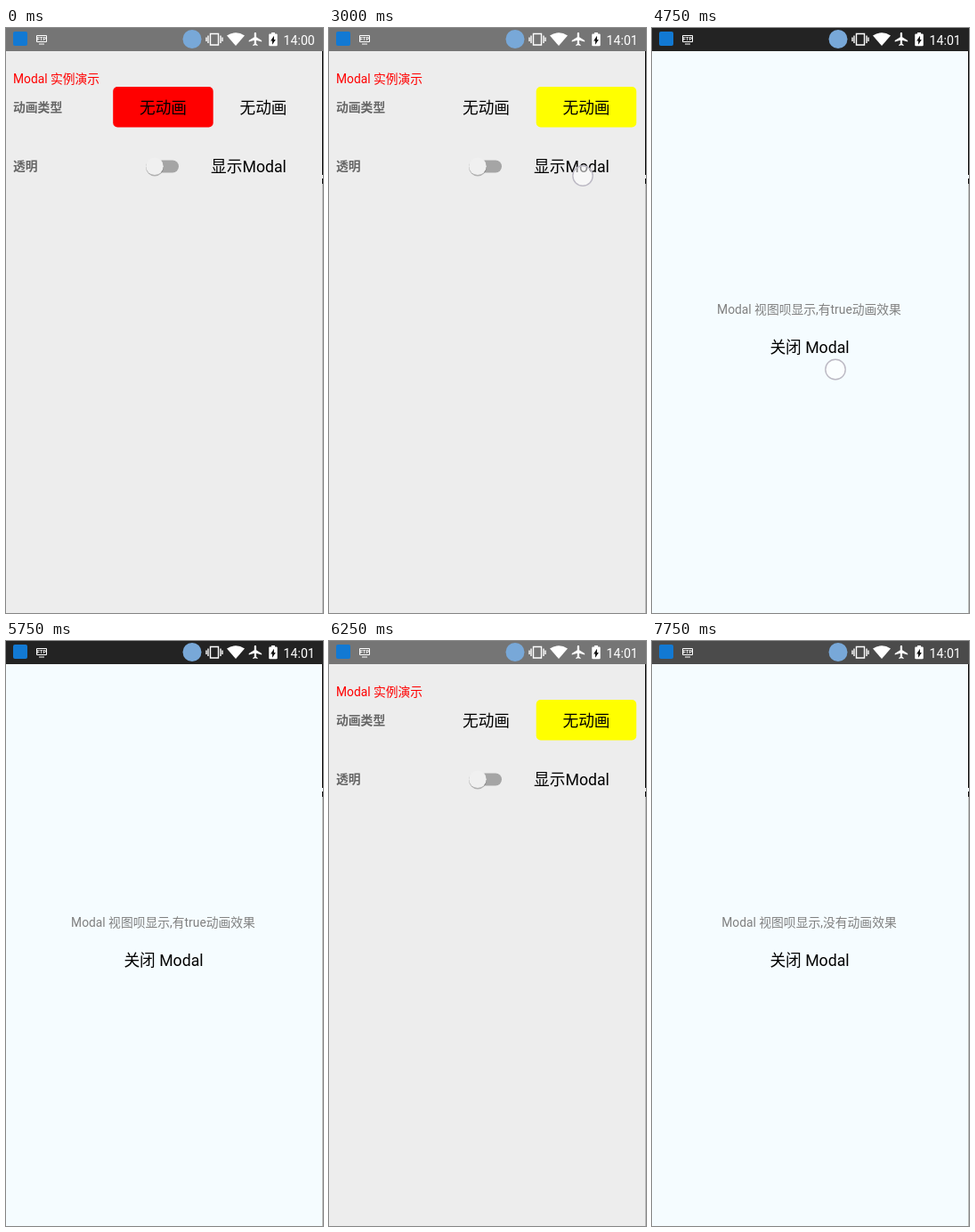
Write an HTML page that moves like this. It is 356 by 657 pixels and loops after 8 s.

```html
<!DOCTYPE html>
<html lang="zh-CN">
<head>
<meta charset="utf-8">
<style>
  html, body { margin: 0; width: 100%; height: 100%; overflow: hidden; }
  svg { display: block; font: 13.8px Roboto, "Noto Sans CJK SC", "Noto Sans CJK", sans-serif; }
  .big { font-size: 17.7px; }
  .label { font-weight: 700; fill: #666; }
  .mid { text-anchor: middle; }
</style>
</head>
<body>
<svg width="356" height="657" viewBox="0 0 356 657">
  <g id="page">
    <rect width="356" height="657" fill="#ededed"/>
    <text x="8" y="62" fill="#f00">Modal 实例演示</text>
    <text class="label" x="8" y="94">动画类型</text>
    <text class="label" x="8" y="160">透明</text>
    <rect id="choice" y="66" width="112.5" height="45.5" rx="5"/>
    <g class="big mid">
      <text x="176.5" y="96">无动画</text>
      <text x="289" y="96">无动画</text>
      <text x="272.5" y="162">显示Modal</text>
    </g>
    <rect x="160" y="148.5" width="34" height="14" rx="7" fill="#a5a5a5"/>
    <circle cx="167" cy="156.5" r="10" fill="#000" opacity=".25"/>
    <circle cx="167" cy="155.3" r="9.8" fill="#f0f0f0"/>
    <rect id="dim" width="356" height="657" opacity=".09"/>
  </g>

  <g id="modal" class="mid">
    <rect width="356" height="657" fill="#f5fcff"/>
    <rect id="pressed" x="20" y="336" width="314" height="44" rx="5" fill="#a9d9d4"/>
    <text id="message" x="176.5" y="320.5" fill="#808080"></text>
    <text class="big" x="177" y="365">关闭 Modal</text>
  </g>

  <circle id="touch" r="11.2" fill="#fff" fill-opacity=".55" stroke="#bcb9c4" stroke-width="1.4"/>

  <rect id="bar" width="356" height="26"/>
  <g fill="#fff">
    <rect x="8" y="4" width="16" height="16" rx="2" fill="#1279d3"/>
    <path d="M34.5 8.5h11v7h-11zM37 18h6" fill="none" stroke="#fff"/>
    <text class="mid" x="40" y="14.3" font-size="5.5" font-weight="700">FTP</text>
    <circle cx="209" cy="12.5" r="10.5" fill="#78a8d8"/>
    <path d="M229.5 6.5h9v12.5h-9zM227 8.5v8.5M225 10.5v4.5M241 8.5v8.5M243 10.5v4.5" fill="none" stroke="#fff" stroke-width="1.4"/>
    <path d="M248 8.5Q258 2 268 8.5L258 20z"/>
    <path transform="translate(271.2 3.4) scale(.76)" d="M21 16v-2l-8-5V3.5c0-.83-.67-1.5-1.5-1.5S10 2.67 10 3.5V9l-8 5v2l8-2.5V19l-2 1.5V22l3.5-1 3.5 1v-1.5L13 19v-5.5l8 2.5z"/>
    <rect x="297" y="8" width="6" height="11" fill="#111"/>
    <path transform="translate(288.6 3.5) scale(.95 .76)" d="M15.7 4H14V2h-4v2H8.3Q7 4 7 5.3v15.4Q7 22 8.3 22h7.4q1.3 0 1.3-1.3V5.3Q17 4 15.7 4zM11 20v-5.5H9L13 7v5.5h2z"/>
    <text id="clock" x="311.5" y="18.5" font-size="14.2"></text>
  </g>
  <path d="M355 26h1v139h-1zM355 169h1v6h-1z"/>
  <path d="M355 175h1v482h-1z" fill="#b8b8b8"/>
</svg>
<script>
const LOOP = 8000;
const el = id => document.getElementById(id);
const show = (id, on) => el(id).setAttribute("display", on ? "inline" : "none");

// start, end, x, y
const touches = [
  [3000, 3250, 285, 166],
  [4750, 5000, 206, 383.5],
  [5000, 5250, 247, 307],
  [6750, 7000, 171.5, 92.5],
  [7500, 7750, 284.5, 159.5]
];

function render(t) {
  const within = (from, to) => t >= from && t < to;
  const animated = within(3250, 6000);
  const modal = animated || t >= 7750;
  const dimmed = within(6000, 6250);
  const yellow = within(500, 1500) || within(2000, 7000);
  const touch = touches.find(([from, to]) => within(from, to));

  show("page", !modal);
  show("modal", modal);
  show("dim", dimmed);
  show("pressed", within(5500, 5750));
  show("touch", touch);
  if (touch) el("touch").setAttribute("transform", `translate(${touch[2]} ${touch[3]})`);

  el("choice").setAttribute("x", yellow ? 232.7 : 120.2);
  el("choice").setAttribute("fill", yellow ? "#ff0" : "#f00");
  el("message").textContent = "Modal 视图呗显示," + (animated ? "有true" : "没有") + "动画效果";
  el("clock").textContent = t < 1500 ? "14:00" : "14:01";
  el("bar").setAttribute("fill",
    within(3500, 6000) ? "#232323" : modal ? "#4b4b4b" : dimmed ? "#535353" : "#757575");
}

function tick() {
  render(performance.now() % LOOP);
  requestAnimationFrame(tick);
}
tick();
</script>
</body>
</html>
```
